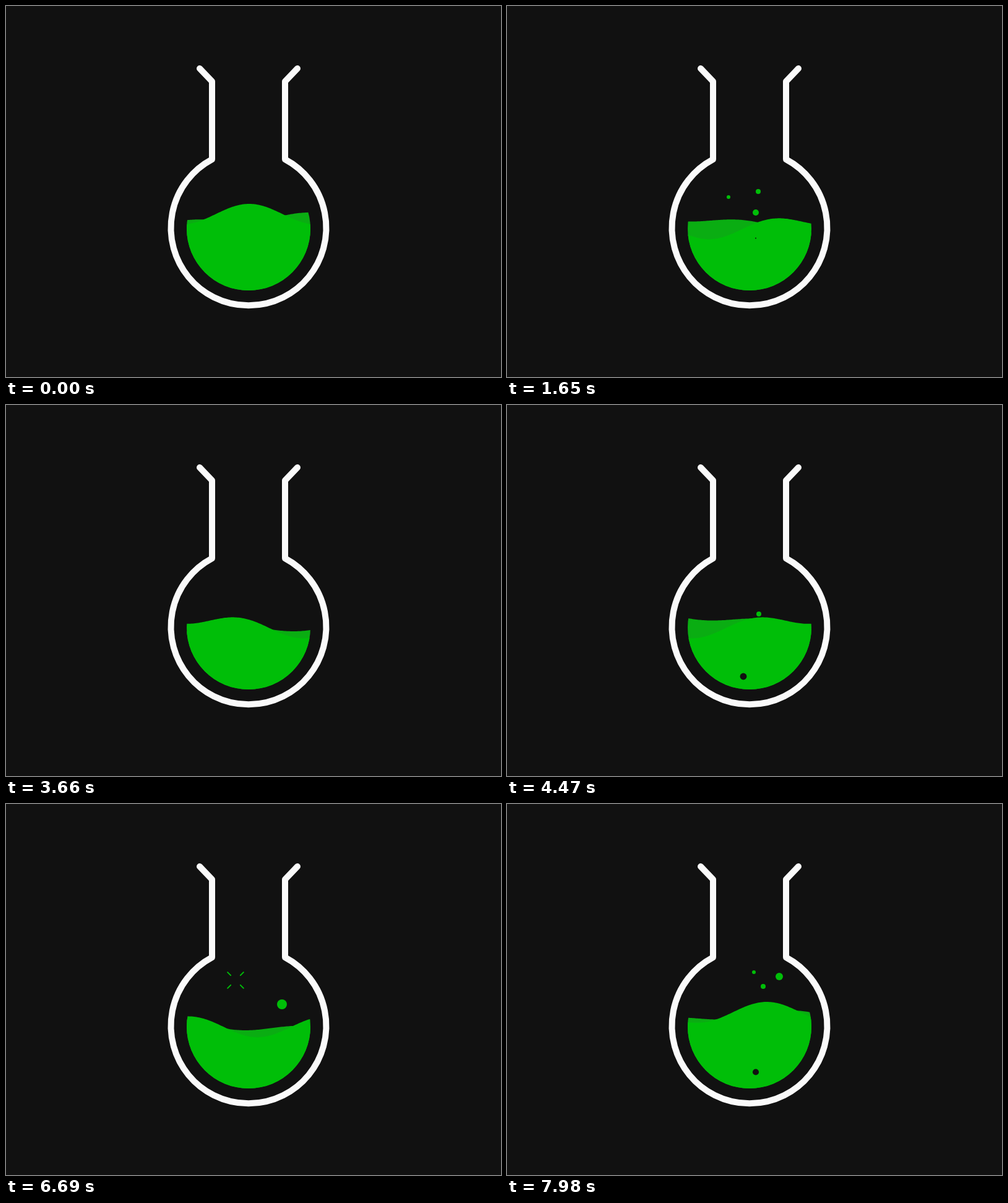
Recreate the animation shown at these times as an HTML page with a canvas. Size 800 px wide and 600 px high, loop 8000 ms.

```html
<!DOCTYPE html>
<html lang="en">
<head>
<meta charset="utf-8">
<title>Bubbling flask</title>
<style>
  html, body { margin: 0; width: 100%; height: 100%; overflow: hidden; background: #111; }
  canvas { display: block; }
</style>
</head>
<body>
<canvas id="stage" width="800" height="600"></canvas>
<script>
const ctx = document.getElementById('stage').getContext('2d');
const DARK = '#111', GREEN = '#00be08', SHADE = '#0aad12', GLASS = '#fafafa';
const TAU = Math.PI * 2;
const LOOP = 8000, WAVE_TIME = 2700;
const flask = new Path2D('M313 101 L333 122 V248 A125.5 125.5 0 1 0 451 248 V122 L471 101');

// Each profile is a long swell with shorter ripples; the two drift in opposite directions.
const backWave = { color: SHADE, length: 800, drift: 1, peak: 493, level: 351.5, swell: 12.4, ripple: 5.3, ripples: 4 };
const frontWave = { color: GREEN, length: 600, drift: -1, peak: 393, level: 348.6, swell: 16.2, ripple: 12.4, ripples: 3 };

// Bubbles that leave the liquid.
const bubbles = [
  { x: 385, radius: 4, start: 250 },
  { x: 358, radius: 3, start: 1172 },
  { x: 406, radius: 4, start: 1072 },
  { x: 402, radius: 5, start: 1450 },
  { x: 358, radius: 3, start: 2117 },
  { x: 407, radius: 4, start: 4314 },
  { x: 371, radius: 5, start: 5856 },
  { x: 446, radius: 8, start: 6379 },
  { x: 399, radius: 3, start: 7091 },
  { x: 414, radius: 4, start: 7347 },
  { x: 440, radius: 6, start: 7169 }
];

function disc(x, y, r, color) {
  ctx.fillStyle = color;
  ctx.beginPath();
  ctx.arc(x, y, r, 0, TAU);
  ctx.fill();
}

function drawWave(wave, t) {
  const peak = wave.peak + wave.drift * wave.length * t / WAVE_TIME;
  ctx.fillStyle = wave.color;
  ctx.beginPath();
  ctx.moveTo(290, 462);
  for (let x = 290; x <= 494; x += 2) {
    const angle = (x - peak) / wave.length * TAU;
    ctx.lineTo(x, wave.level - wave.swell * Math.cos(angle) - wave.ripple * Math.cos(wave.ripples * angle));
  }
  ctx.lineTo(494, 462);
  ctx.fill();
}

// Dark bubbles form at the bottom at a steady pace and shrink as they rise.
function drawSunken(t) {
  const period = 3455, sinceFirst = t - 825;
  if (sinceFirst < 0) return;
  const u = sinceFirst % period / 880;
  const x = Math.floor(sinceFirst / period) % 2 ? 382 : 402;
  if (u < 1) disc(x, 458 - 88 * u, (6.8 - 6.2 * u) * Math.min(1, u * 8), DARK);
}

function drawBurst(x, y, u) {
  const from = 5 + 17 * u, to = from + 11 * (1 - u);
  ctx.strokeStyle = GREEN;
  ctx.lineWidth = 2;
  ctx.beginPath();
  for (let i = 0; i < 4; i++) {
    const angle = (i + 0.5) * TAU / 4;
    const dx = Math.cos(angle), dy = Math.sin(angle);
    ctx.moveTo(x + dx * from, y + dy * from);
    ctx.lineTo(x + dx * to, y + dy * to);
  }
  ctx.stroke();
}

function drawAirborne({ x, radius, start }, index, t) {
  const surface = 352, speed = 0.09;
  const top = 285 - 10 * (index % 3);
  const age = t - start;
  if (age < 0) return;
  const burst = (age - (surface - top) / speed) / 250;
  if (burst < 0) disc(x, surface - speed * age, radius * Math.min(1, age / 120), GREEN);
  else if (burst < 1) drawBurst(x, top, burst);
}

function draw(now) {
  const t = now % LOOP;
  ctx.fillStyle = DARK;
  ctx.fillRect(0, 0, 800, 600);

  ctx.save();
  ctx.beginPath();
  ctx.arc(392, 360, 100, 0, TAU);
  ctx.clip();
  drawWave(backWave, t);
  drawWave(frontWave, t);
  drawSunken(t);
  ctx.restore();

  ctx.lineCap = ctx.lineJoin = 'round';
  bubbles.forEach((bubble, index) => drawAirborne(bubble, index, t));

  ctx.strokeStyle = GLASS;
  ctx.lineWidth = 10;
  ctx.stroke(flask);
}

let startTime;
function tick(now) {
  startTime ??= now;
  draw(now - startTime);
  requestAnimationFrame(tick);
}
draw(0);
requestAnimationFrame(tick);
</script>
</body>
</html>
```
